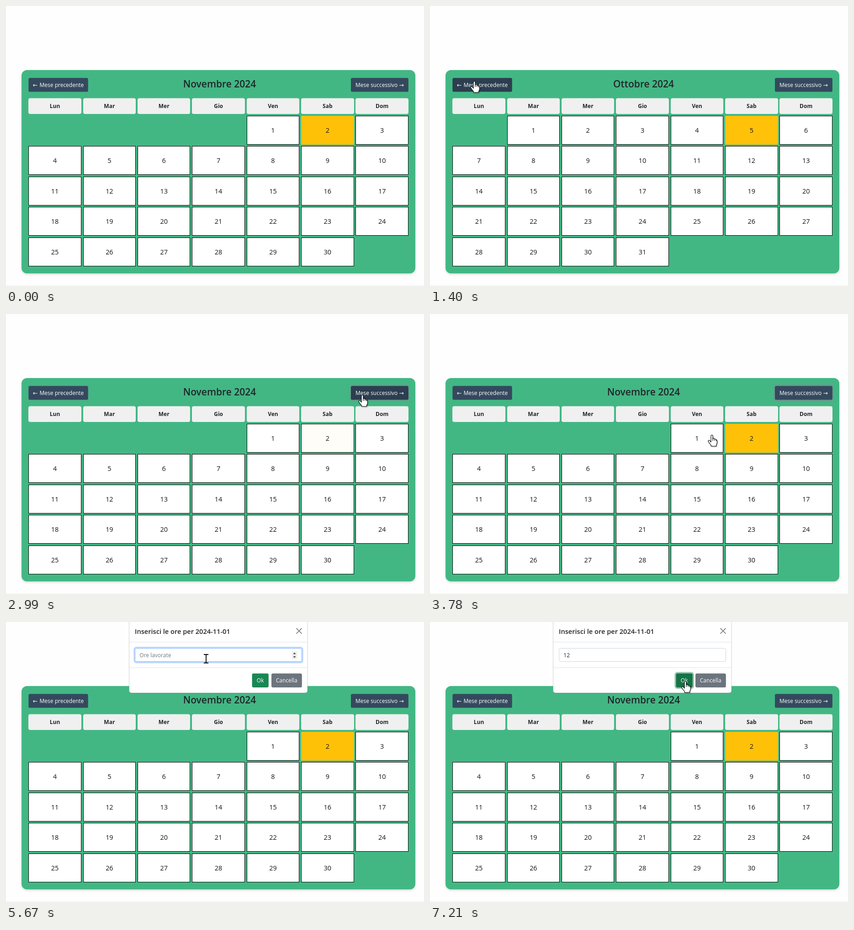
Recreate the animation shown at these times as an HTML page. Size 915x612 px, loop 8 s.

```html
<!DOCTYPE html>
<html lang="it">
<head>
<meta charset="utf-8">
<title>Calendario</title>
<style>
  html, body { margin: 0; width: 100%; height: 100%; overflow: hidden; background: #fefefe; }
  svg { display: block; width: 915px; height: 612px; }
  text { font-family: "Open Sans", "Noto Sans", sans-serif; font-size: 12px; fill: #212529; }
  .arrow { font-family: "DejaVu Sans", sans-serif; font-size: 12.5px; }
  .mid { text-anchor: middle; }
  .light { fill: #fff; }
  .month { font-size: 21px; font-weight: 600; }
  .weekday { font-weight: 700; }
  .day { font-size: 14.4px; fill: #111; }
  .heading { font-size: 14.6px; font-weight: 600; }
</style>
</head>
<body>
<svg id="stage" viewBox="0 0 915 612" xmlns="http://www.w3.org/2000/svg">
  <defs>
    <filter id="soft" x="-10%" y="-10%" width="120%" height="120%">
      <feDropShadow dx="0" dy="2" stdDeviation="2.4" flood-color="#000" flood-opacity=".14"/>
    </filter>
    <filter id="drop" x="-40%" y="-40%" width="200%" height="200%">
      <feDropShadow dx="1" dy="1.2" stdDeviation="1" flood-color="#000" flood-opacity=".3"/>
    </filter>
  </defs>
</svg>
<script>
const LOOP = 8000;
const NS = "http://www.w3.org/2000/svg";
const stage = document.getElementById("stage");

function add(parent, tag, attrs, text) {
  const el = document.createElementNS(NS, tag);
  set(el, attrs);
  if (text !== undefined) el.textContent = text;
  parent.appendChild(el);
  return el;
}
function set(el, attrs) {
  for (const key in attrs) el.setAttribute(key, attrs[key]);
}
const box = (parent, x, y, width, height, rx, fill, more) =>
  add(parent, "rect", { x, y, width, height, rx, fill, ...more });
const label = (parent, x, y, cls, text) => add(parent, "text", { x, y, class: cls }, text);

const clamp = v => Math.max(0, Math.min(1, v));
const ease = v => { v = clamp(v); return v * v * (3 - 2 * v); };
const fade = (t, start, span = 150) => ease((t - start) / span);
const pulse = (t, on, off, span) => fade(t, on, span) - fade(t, off, span);
const mix = (a, b, k) => `rgb(${a.map((v, i) => Math.round(v + (b[i] - v) * k))})`;
const show = (el, on) => el.setAttribute("visibility", on ? "visible" : "hidden");

// Calendar panel
box(stage, 0, 611, 915, 1, 0, "#f1f1f1");
box(stage, 34, 140, 862, 444.5, 12, "#43b784", { filter: "url(#soft)" });

function button(parent, x, y, w, ringFill) {
  const ring = box(parent, x - 3.2, y - 3.2, w + 6.4, 36.8, 6, ringFill);
  const face = box(parent, x, y, w, 30.4, 3.2, "#35495e");
  return { ring, face };
}
const prev = button(stage, 49.3, 157.2, 130.4, "rgba(130,138,145,.6)");
const next = button(stage, 755, 157.2, 125.9, "rgba(130,138,145,.6)");
label(stage, 58.5, 177, "arrow light", "←");
label(stage, 73.5, 177, "light", "Mese precedente");
label(stage, 765, 177, "light", "Mese successivo");
label(stage, 860.5, 177, "arrow light", "→");
const month = label(stage, 467.5, 178, "month mid", "");

const colX = i => Math.round(49.3 + 119.36 * i);
const colEnd = i => Math.round(164.7 + 119.36 * i);
const rowY = i => Math.round(239.6 + 66.6 * i);
const colMid = i => 107 + 119.36 * i;

["Lun", "Mar", "Mer", "Gio", "Ven", "Sab", "Dom"].forEach((name, i) => {
  box(stage, colX(i), 201.5, colEnd(i) - colX(i), 34.5, 4, "#f0f0f0");
  label(stage, colMid(i), 223.4, "weekday mid", name);
});

const cells = Array.from({ length: 35 }, (_, i) => {
  const col = i % 7, row = Math.floor(i / 7);
  const group = add(stage, "g", {});
  const face = box(group, colX(col) + .5, rowY(row) + .5, colEnd(col) - colX(col) - 1, 62, 0,
    "#fff", { stroke: "#000" });
  const text = label(group, colMid(col), rowY(row) + 36.8, "day mid", "");
  return { group, face, text };
});
const SATURDAY = 5;

let shownMonth = "";
function fillMonth(name, offset, count) {
  if (name === shownMonth) return;
  shownMonth = name;
  month.textContent = name;
  cells.forEach((cell, i) => {
    const day = i - offset + 1;
    show(cell.group, day >= 1 && day <= count);
    cell.text.textContent = day;
  });
}

// Dialog
const modal = add(stage, "g", {});
box(modal, 269.5, -60, 390.5, 215, 5, "#fff", { stroke: "#000", "stroke-opacity": .18 });
box(modal, 270, 43.5, 389.5, 1, 0, "#dee2e6");
box(modal, 270, 99.3, 389.5, 1, 0, "#dee2e6");
label(modal, 282, 25.8, "heading", "Inserisci le ore per 2024-11-01");
add(modal, "path", { d: "M636 14L647 25M647 14L636 25", stroke: "#777", "stroke-width": 1.7, "stroke-linecap": "round" });

const inputRing = box(modal, 279.2, 53.9, 371.6, 36.3, 6, "#c2dbfe");
const input = box(modal, 282.5, 57.5, 365, 29, 3.2, "#fff");
const value = label(modal, 292.3, 77, "", "");
const caret = box(modal, 292, 64, 1, 17, 0, "#000");
const spinner = add(modal, "g", {});
box(spinner, 625.5, 64, 12, 17, 1, "#efefef");
add(spinner, "path", { d: "M628.5 70.3L631.5 66.8L634.5 70.3ZM628.5 75L631.5 78.5L634.5 75Z", fill: "#444" });

const ok = button(modal, 538.6, 112.5, 36.2, "rgba(60,153,110,.55)");
const cancel = button(modal, 581, 112.5, 66.8, "none");
set(cancel.face, { fill: "#6c757d" });
label(modal, 556.7, 132.3, "mid light", "Ok");
label(modal, 614.2, 132.3, "mid light", "Cancella");

// Pointers, each with its hot spot at 0,0
const pointer = add(stage, "g", {});
const outline = { fill: "#fff", stroke: "#000", "stroke-width": 1.1, "stroke-linejoin": "round", filter: "url(#drop)" };
const shapes = {
  arrow: add(pointer, "path", { ...outline, d: "M.5 .5V17.3L4.4 13.7L7.2 20.2L9.8 19L7 12.7H12.4Z" }),
  hand: add(pointer, "path", {
    ...outline,
    d: "M-2 2.2Q-2 .5 0 .5Q2 .5 2 2.2V8.6Q3.3 7.5 4.8 8.1Q6 8.6 6 9.7Q7.4 8.8 8.6 9.6Q9.4 10.2 9.4 11" +
       "Q11.4 11 11.4 13.4V17Q11.4 20 9.6 22.2V25H-1.6V23Q-5.4 18.8 -7.8 14.6Q-8.4 12.7 -6.7 12.1" +
       "Q-5.2 11.8 -3.7 14L-2 15.8ZM2 8.6V13M6 9.7V13M9.4 11V13.6"
  }),
  beam: add(pointer, "path", {
    d: "M-5 -9H-1L0 -8L1 -9H5M-5 9.5H-1L0 8.5L1 9.5H5M0 -8V8.5", fill: "none", stroke: "#000", "stroke-width": 1.8
  })
};

const path = [
  [130, 823, 582], [320, 680, 470], [520, 430, 300], [690, 200, 178], [780, 130, 150], [890, 101, 158], [1030, 97, 164],
  [1850, 97, 164], [1930, 190, 172], [2110, 639, 186], [2250, 742, 185], [2400, 774, 180], [2580, 780, 177],
  [3300, 780, 177], [3430, 752, 203], [3600, 665, 250], [3780, 617, 264], [3980, 612, 268],
  [4180, 612, 268], [4290, 612, 284], [4450, 612, 284], [4660, 575, 200], [4900, 462, 100], [5100, 438, 80],
  [6420, 438, 80], [6600, 480, 95], [6800, 545, 121], [6980, 559, 129]
];
function pointerAt(t) {
  const i = path.findIndex(p => p[0] > t);
  if (i < 0) return path[path.length - 1].slice(1);
  if (i === 0) return null;
  const a = path[i - 1], b = path[i], k = (t - a[0]) / (b[0] - a[0]);
  return [a[1] + (b[1] - a[1]) * k, a[2] + (b[2] - a[2]) * k];
}
const inside = (x, y, l, top, r, bottom) => x >= l && x <= r && y >= top && y <= bottom;

function pointerKind(t, x, y) {
  if (t > 4200) {
    if (inside(x, y, 282, 57, 648, 87)) return "beam";
    return inside(x, y, 538, 112, 575, 143) ? "hand" : "arrow";
  }
  const overCell = cells.some((cell, i) => cell.group.getAttribute("visibility") === "visible" &&
    inside(x, y, colX(i % 7), rowY(Math.floor(i / 7)), colEnd(i % 7), rowY(Math.floor(i / 7)) + 63));
  const overButton = inside(x, y, 49, 157, 180, 188) || inside(x, y, 755, 157, 881, 188);
  return overCell || overButton ? "hand" : "arrow";
}

function drawButtons(t) {
  const base = [53, 73, 94], dark = [44, 62, 80];
  set(prev.face, { fill: mix(base, dark, pulse(t, 890, 1900)) });
  set(next.face, { fill: mix(base, dark, pulse(t, 2320, 3400)) });
  set(prev.ring, { opacity: pulse(t, 1410, 2890) });
  set(next.ring, { opacity: pulse(t, 2890, 4140) });
}

function drawToday(t) {
  const k = 1 - pulse(t, 1390, 2970, 190);
  set(cells[SATURDAY].face, {
    fill: mix([255, 255, 255], [255, 193, 7], k),
    stroke: mix([0, 0, 0], [250, 190, 12], k)
  });
}

function drawModal(t) {
  const slide = 1 - (1 - clamp((t - 4130) / 190)) ** 2;
  set(modal, { opacity: clamp((t - 4150) / 140), transform: `translate(0 ${(slide - 1) * 40})` });
  show(modal, t >= 4150);

  const focus = pulse(t, 5130, 7050);
  set(inputRing, { opacity: focus });
  set(input, { stroke: mix([206, 212, 218], [134, 183, 254], focus) });

  const typed = t < 6000 ? "" : t < 6330 ? "1" : "12";
  value.textContent = typed || "Ore lavorate";
  value.style.fill = typed ? "#212529" : "#71767b";
  set(caret, { x: 292 + Math.round(6.9 * typed.length) });
  const caretOn = (t >= 5140 && t < 5670) || (t >= 6000 && t < 6860);
  set(caret, { opacity: caretOn ? 1 : 0 });

  set(ok.face, { fill: mix([25, 135, 84], [21, 115, 71], fade(t, 6780)) });
  set(ok.ring, { opacity: fade(t, 7060) });
}

function drawPointer(t) {
  const spot = pointerAt(t);
  const kind = spot ? pointerKind(t, ...spot) : "";
  for (const name in shapes) set(shapes[name], { display: name === kind ? "inline" : "none" });
  if (spot) set(pointer, { transform: `translate(${spot.map(Math.round).join(" ")})` });
  set(spinner, { opacity: (t >= 5130 && t < 7050) || kind === "beam" ? 1 : 0 });
}

function draw(t) {
  if (t >= 1395 && t < 2975) fillMonth("Ottobre 2024", 1, 31);
  else fillMonth("Novembre 2024", 4, 30);
  drawButtons(t);
  drawToday(t);
  drawModal(t);
  drawPointer(t);
}

const start = performance.now();
function tick() {
  draw((performance.now() - start) % LOOP);
  requestAnimationFrame(tick);
}
tick();
</script>
</body>
</html>
```
